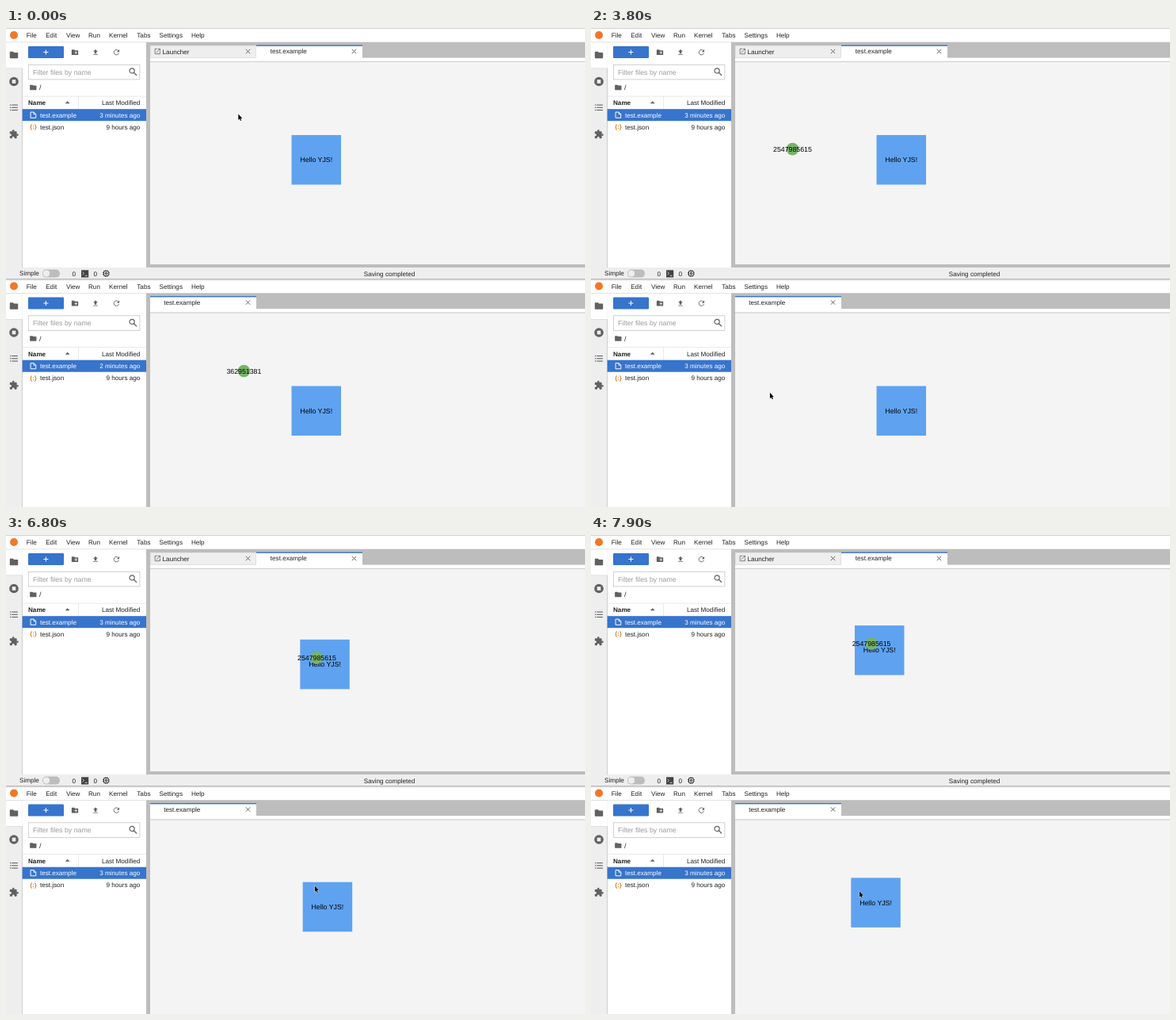
Animation, 731 px wide and 604 px high, one loop 8000 ms. Source, as an HTML page:

```html
<!DOCTYPE html>
<html lang="en">
<head>
<meta charset="utf-8">
<title>Shared canvas</title>
<style>
  html, body { margin: 0; width: 100%; height: 100%; overflow: hidden; background: #fff; }
  svg { display: block; }
  text { font: 8.15px "Liberation Sans", Arial, sans-serif; fill: #212121; text-rendering: geometricPrecision; white-space: pre; }
  .big { font-size: 8.78px; }
  .canvas text { font-size: 8.78px; fill: #000; text-anchor: middle; }
  .end { text-anchor: end; }
  .mid { text-anchor: middle; }
  .bold { font-weight: bold; }
  .white { fill: #fff; }
  .dim { fill: #9a9a9a; }
  .json { font-size: 7.6px; font-weight: bold; fill: #e3761c; }
</style>
</head>
<body>
<svg id="stage" width="731" height="604" viewBox="0 0 731 604"></svg>
<script>
const LOOP = 8000, STEP = 100, LAG = 60;
const PANE = 316.5;            // vertical distance between the two windows
const BOX = 62.5, HOME = [360.5, 135];
const GRAB = [13.7, 15];       // pointer position inside the dragged box
const DRAG_START = 6685;
const BLUE = '#3774cc', GREY = '#bdbdbd', ICON = '#616161';

// ---- Drawing helpers ----
const rect = (x, y, w, h, fill, extra = '') =>
  `<rect x="${x}" y="${y}" width="${w}" height="${h}" fill="${fill}" ${extra}/>`;
const circle = (x, y, r, fill, extra = '') =>
  `<circle cx="${x}" cy="${y}" r="${r}" fill="${fill}" ${extra}/>`;
const shape = d => `<path d="${d}"/>`;
const line = (d, w = 2) => `<path d="${d}" fill="none" stroke="currentColor" stroke-width="${w}"/>`;
const text = (x, y, s, cls = '', id = '') =>
  `<text x="${x}" y="${y}" class="${cls}" id="${id}">${s}</text>`;
const repeat = (list, f) => list.map(f).join('');

// Icons in a 24 by 24 box
const FOLDER = shape('M3.500 4H10l2 2h8.500q1.500 0 1.500 1.500v11q0 1.500-1.500 1.500h-17q-1.500 0-1.500-1.500v-13q0-1.500 1.500-1.500z');
const ICONS = {
  folder: FOLDER,
  newFolder: FOLDER + '<path d="M15 9v8m-4-4h8" stroke="#fff" stroke-width="2"/>',
  running: circle(12, 12, 10, 'currentColor') + rect(8, 8, 8, 8, '#eee'),
  list: repeat([6, 12, 18], y => circle(4, y, 1.5, 'currentColor') + line(`M7 ${y}h14`)),
  puzzle: rect(2, 5, 17, 17, 'currentColor', 'rx="2"') +
    circle(10.5, 3.5, 2.5, 'currentColor') + circle(20.5, 13.5, 2.5, 'currentColor') +
    circle(3.5, 13.5, 2.7, '#eee') + circle(10.5, 20.5, 2.7, '#eee') +
    rect(0, 10.8, 3.5, 5.4, '#eee') + rect(7.8, 20.5, 5.4, 3.5, '#eee'),
  upload: shape('M5 20h14v-2H5zM5 10h4v6h6v-6h4l-7-7z'),
  refresh: line('M18.700 14A7 7 0 1 1 17 7') + shape('M13 11h7V4z'),
  search: circle(9.5, 9.5, 5.5, 'none', 'stroke="currentColor" stroke-width="2.1"') + line('M13.500 13.500L20 20', 2.4),
  file: line('M14 3.200H3.800v17.600h16.400V9.400zM13.500 3.500v6h6', 2.4),
  launch: line('M12 4H4v16h16v-8M14 4h6v6M20 4L8.500 15.500'),
  chip: line('M6 6h12v12H6zM10 10h4v4h-4z') + repeat([10, 14], p => line(`M${p} 3v3m0 12v3M3 ${p}h3m12 0h3`))
};
const icon = (name, cx, cy, size, color = ICON) =>
  `<g color="${color}" fill="${color}" transform="translate(${cx - size / 2} ${cy - size / 2}) scale(${size / 24})">${ICONS[name]}</g>`;
const cross = (x, y) =>
  `<path d="M${x - 2.7} ${y - 2.7}l5.4 5.4m0-5.4l-5.4 5.4" stroke="#555" stroke-width=".9"/>`;

// ---- Windows ----
function tab(x, label, labelX, active) {
  const face = active
    ? rect(x, 22, 134, 17, '#fff') + rect(x, 21.5, 134, 1.4, BLUE)
    : rect(x, 22, 134, 15.6, '#eee', 'stroke="#c4c4c4" stroke-width=".6"') + icon('launch', x + 9.3, 29.5, 9.5);
  return face + text(labelX, active ? 32.2 : 32.5, label) + cross(x + 123.5, 29.5);
}

function sidebar() {
  return rect(0, 18, 20.6, 300, '#eee') + rect(20, 18, .7, 300, GREY) +
    rect(0, 18, 20.8, 33, '#fff') + rect(0, 50.6, 20.6, .6, '#d0d0d0') + rect(0, 17.6, 177, .6, '#d0d0d0') +
    icon('folder', 10, 34, 12.5) + icon('running', 10, 67.5, 14) +
    icon('list', 10, 100.3, 13) + icon('puzzle', 10, 134, 12.5);
}

function files(id, ago) {
  return rect(28, 23, 45, 15, BLUE, 'rx="1.2"') +
    '<path d="M47.4 30.5h6m-3-3v6" stroke="#fff" stroke-width="1"/>' +
    icon('newFolder', 87, 30.7, 10) + icon('upload', 113, 30.7, 10) + icon('refresh', 139.4, 30.7, 11) +
    rect(28.3, 46.3, 140.6, 18.6, '#fff', `stroke="${GREY}" stroke-width=".7"`) +
    text(34, 58.7, 'Filter files by name', 'big dim') + icon('search', 160.5, 55.3, 13.4) +
    icon('folder', 34.3, 75, 10) + text(42, 78.2, '/', 'big') +
    rect(20.7, 85.8, 156.3, .6, '#dcdcdc') + rect(91.3, 86, .6, 16, '#dcdcdc') +
    text(28, 97.2, 'Name', 'bold') + '<path d="M74.7 95.3l3-3 3 3z" fill="#616161"/>' +
    text(169.3, 97.2, 'Last Modified', 'end') +
    rect(20.6, 102.2, 156.4, 15, BLUE) + icon('file', 34.4, 109.7, 9.8, '#fff') +
    text(42.9, 112.7, 'test.example', 'white') + text(169.3, 112.7, ago, 'white end', id) +
    text(34.4, 127.3, '{:}', 'json mid') +
    text(42.9, 127.8, 'test.json') + text(169.3, 127.8, '9 hours ago', 'end');
}

function pane(key, peer, tabs, bottom) {
  const menu = { File: 25.8, Edit: 50.2, View: 75.9, Run: 104, Kernel: 130, Tabs: 165.3, Settings: 193.6, Help: 233.9 };
  return rect(0, 0, 731, 320, '#fff') + rect(0, 0, 731, .8, '#c6c6c6') + circle(10, 9, 5, '#f37726') +
    repeat(Object.entries(menu), ([s, x]) => text(x, 12, s)) +
    sidebar() + files('ago-' + key, '3 minutes ago') +
    rect(177, 17.7, 554, 302, GREY) + tabs +
    rect(182, 37.6, 549, 5, '#fff') + rect(182, 42, 549, .7, GREY) +
    `<svg class="canvas" x="182" y="42.7" width="549" height="${bottom - 42.7}" viewBox="182 42.7 549 ${bottom - 42.7}">` +
    rect(182, 42.7, 549, 300, '#f4f4f4') +
    `<g id="box-${key}">${rect(0, 0, BOX, BOX, '#5fa2f0')}${text(BOX / 2, 34.2, 'Hello YJS!')}</g>` +
    `<g id="peer-${key}">${circle(0, 0, 7.8, '#77b466')}${text(0, 3.1, peer)}</g></svg>`;
}

function statusBar() {
  return rect(0, 302, 731, 15, '#eee') + text(17, 312.4, 'Simple') +
    rect(46, 304.6, 22, 10, GREY, 'rx="5"') + circle(51, 309.6, 4.1, '#eee') +
    text(83.4, 312.7, '0') + rect(95, 305.3, 9.2, 9.2, '#424242') +
    '<path d="M96.5 307.5l2 2-2 2m3.2.8h3" fill="none" stroke="#eee" stroke-width=".8"/>' +
    text(110.4, 312.7, '0') + icon('chip', 126.4, 309.5, 11.5, '#333') +
    text(451.8, 312.6, 'Saving completed');
}

const $ = id => document.getElementById(id);
$('stage').innerHTML =
  pane('top', '2547985615', tab(182, 'Launcher', 197.6, false) + tab(316, 'test.example', 333.8, true), 298) +
  statusBar() +
  `<g transform="translate(0 ${PANE})">${pane('low', '362951381', tab(182, 'test.example', 199.2, true), 320)}</g>` +
  rect(0, 316.2, 731, 1, '#b4b4b4') + rect(0, 317.2, 731, 1.6, '#000', 'opacity=".06"') +
  '<path id="pointer" d="M.3.5V8L2 6.400 3.200 9 4.300 8.500 3.200 6H5.300Z" stroke="#fff" stroke-width=".9" paint-order="stroke"/>';

// ---- Pointer motion: glides and orbits, resting in between ----
const linear = k => k;
const smooth = k => k * k * (3 - 2 * k);
const easeIn = k => k * k;
const easeOut = (p = 2) => k => 1 - (1 - k) ** p;
const slowing = k => k * (1.74 - .74 * k);

let spot = [293, 108];
const moves = [{ start: 0, end: 1, at: () => [293, 108], ease: linear }];

function move(start, end, at, ease) {
  moves.push({ start, end, at, ease });
  spot = at(1);
}

function glide(start, end, x, y, ease = smooth) {
  const [x0, y0] = spot;
  move(start, end, k => [x0 + (x - x0) * k, y0 + (y - y0) * k], ease);
}

// Counter-clockwise from angle a to b; tilt skews the ellipse, grow opens it from its centre
function orbit(start, end, [cx, cy], [rx, ry], [a, b], { tilt = 0, grow = 0, ease = linear } = {}) {
  const rad = Math.PI / 180;
  move(start, end, k => {
    const angle = a + (b - a) * k, size = grow ? Math.min(1, k / grow) : 1;
    return [cx + size * rx * Math.cos(angle * rad), cy - size * ry * Math.sin((angle + tilt) * rad)];
  }, ease);
}

// Circle in the upper window, then cross to the lower one
orbit(501, 1300, [300, 108], [35, 27.5], [-300, 100], { tilt: 17, grow: .25 });
glide(1300, 2340, 281, 396.5);
// Circle there and sweep left, then right
glide(2600, 2700, 294, 464.5, easeOut(3.5));
orbit(2700, 3700, [282, 455], [20, 26], [-53, 525], { tilt: 31.7 });
glide(3700, 4200, 153, 453, easeOut(1.85));
glide(4500, 5400, 620, 455);
// Up over the tab bar and down onto the box
glide(5400, 5640, 540, 340, easeIn);
glide(5640, 6000, 404, 365.5, easeIn);
glide(6000, 6240, 374.2, 466.5, easeOut());
// Drag the box around
orbit(DRAG_START, 7240, [355.6, 451.6], [34, 42.2], [-57, 214], { tilt: 14 });
orbit(7400, 7900, [370.6, 469], [48, 27], [-152, 131.8], { ease: slowing });

function pointerAt(t) {
  const m = moves.findLast(m => m.start <= t) || moves[0];
  return m.at(m.ease(Math.min(1, Math.max(0, (t - m.start) / (m.end - m.start)))));
}

const place = (id, x, y) => $(id).setAttribute('transform', `translate(${x} ${y})`);

function boxAt(t) {
  if (t < DRAG_START) return HOME;
  const [x, y] = pointerAt(t);
  return [x - GRAB[0], y - GRAB[1] - PANE];
}

function draw(time) {
  const t = Math.floor((time % LOOP) / STEP) * STEP;
  place('pointer', ...pointerAt(t));
  place('box-low', ...boxAt(t - LAG / 2));
  place('box-top', ...boxAt(t - LAG));

  // Each window shows the other window's pointer, slightly late
  const [x, y] = pointerAt(t - LAG);
  const inTop = x > 182 && y > 43 && y < 298, inLow = x > 182 && y > 359;
  $('peer-low').style.display = inTop ? '' : 'none';
  $('peer-top').style.display = inLow ? '' : 'none';
  place('peer-low', x + 7.4, y + 8);
  place('peer-top', x + 7.4, y + 8 - PANE);

  $('ago-low').textContent = (t < 100 ? 2 : 3) + ' minutes ago';
}

const start = performance.now();
function tick() {
  draw(performance.now() - start);
  requestAnimationFrame(tick);
}
tick();
</script>
</body>
</html>
```
